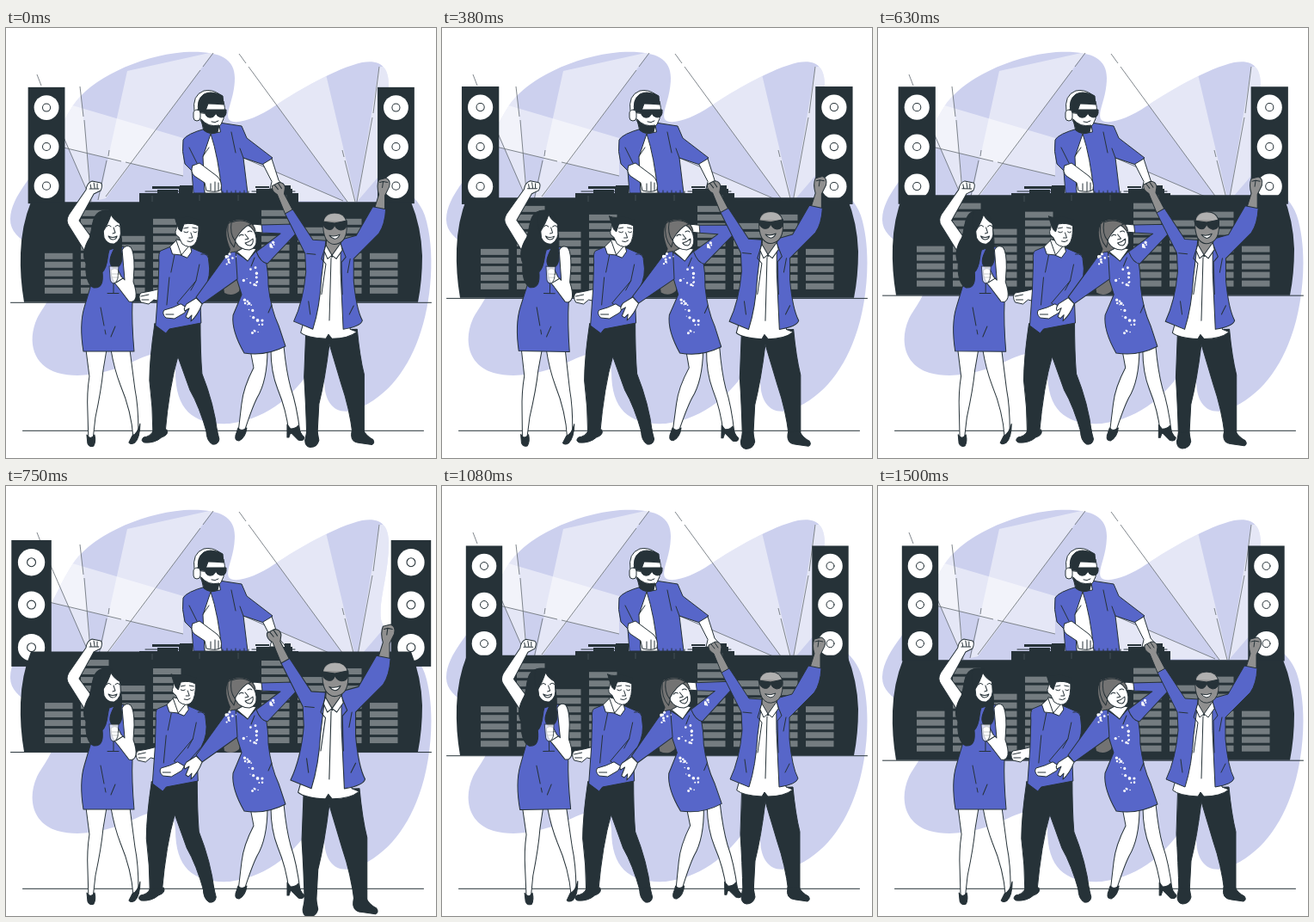
These frames come from a looping animation (500 px wide and 500 px high, 1540 ms). An HTML page:

```html
<!DOCTYPE html>
<html lang="en">
<head>
<meta charset="utf-8">
<title>Dance party</title>
<style>
html, body { margin: 0; width: 100%; height: 100%; overflow: hidden; background: #fff; }
svg { display: block; width: 100%; height: 100%; }
.ink { stroke: #263238; stroke-width: 1; stroke-linejoin: round; stroke-linecap: round; }
.b { fill: #5766c9; }
.k { fill: #263238; }
.w { fill: #fff; }
.g { fill: #909090; }
.h { fill: #737373; }
.n { fill: none; }
.bare { stroke: none; }
.beam { fill: #fff; opacity: .5; }
.ray { fill: none; stroke: #737a80; stroke-width: .9; }
</style>
</head>
<body>
<svg viewBox="0 0 500 500">
  <defs>
    <path id="blob" d="M5 222C6 195 32 172 48 145C58 128 64 112 78 90C98 60 152 33 207 28C246 26 266 34 266 58C266 82 255 97 259 106C265 114 290 106 312 91C342 71 384 47 414 40C436 36 445 46 445 66C445 104 433 132 436 155C442 180 476 186 487 218C500 258 495 320 480 360C465 402 438 434 402 445C382 449 371 436 370 412C371 390 366 385 355 396C337 423 308 454 260 460C220 462 197 446 197 400C196 374 177 374 152 386C119 402 86 408 60 401C32 393 24 365 36 338C44 322 62 305 56 278C48 256 4 250 5 222Z"/>
    <clipPath id="inBlob"><use href="#blob"/></clipPath>
  </defs>

  <use href="#blob" fill="#ccd0ee"/>
  <g clip-path="url(#inBlob)">
    <path class="beam" d="M36 54L86 68L100 202Z"/>
    <path class="beam" d="M141 50L241 28L116 198L108 200Z"/>
    <path class="beam" d="M50 82L206 128V172L50 135Z"/>
    <path class="beam" d="M271 30L372 54L407 202H397Z"/>
    <path class="beam" d="M434 45L470 45V130L408 202Z"/>
    <path class="beam" d="M276 151L392 201H276Z"/>
  </g>
  <g class="ray">
    <path d="M36 54L41 67M43 72L97 196M86 68L90 103M91 107L99 202M241 29L229 45M226 49L116 196M120 142L119 149M117 154L107 200M50 135L134 155M139 156L206 172"/>
    <path d="M271 30L279 41M282 45L397 202M434 45L427 99M426 104L408 202M391 142L393 150M394 154L406 202M276 151L392 201"/>
  </g>

  <g id="speakers"></g>
  <g id="booth">
    <path class="k" d="M29 202.500H471Q483 232 484 265Q484 294 479 319H21Q16 290 17 262Q18 230 29 202.500Z"/>
    <g id="bars" fill="#747c80"></g>
    <path class="ink n" d="M5.500 319.500H494.500"/>
  </g>
  <path class="ink n" d="M19.500 468.300H485.500"/>

  <!-- DJ -->
  <g class="ink">
    <path class="w" d="M228 119L248 109L258 119L266 192H231L226 148Z"/>
    <path class="b" d="M232 117Q210 123 206 130Q204 143 208 158L216 166L218 192H231L229 150L238 123Z"/>
    <path class="b" d="M248 110L274 114L280 128L310 151L300 159L276 151L281 192H251Q247 150 238 123L249 121Z"/>
    <path class="w" d="M217 160L225 157L245 172Q252 178 250 188Q245 192 233 189L231 180L219 172Q214 167 217 160Z"/>
    <path class="w" d="M299 158L309 152L317 177Q324 184 327 190L318 187H307L309 179Z"/>
    <path class="n" d="M238 181V189M243 179V190M247 180V189M213 139L222 157M229 149L236 139M276 151L272 140M262 121L267 145"/>
    <path class="w" d="M227 84L253 85Q257 100 250 112Q244 121 231 116L225 105Z"/>
    <path class="k" d="M224 98Q220 82 231 77Q242 72 252 79L253 89Q242 88 235 88L231 99Z"/>
    <path class="k" d="M227 106Q235 116 248 113L246 121Q237 125 230 119Z"/>
    <path class="k" d="M231 95H256Q257 104 250 104Q245 103 244 99Q242 105 236 104Q231 103 231 95Z"/>
    <path class="n" d="M239 109Q243 111 247 108"/>
    <path class="w" d="M219 97Q216 78 230 73Q240 71 248 77Q237 73 230 77Q221 83 224 98Z"/>
    <rect class="w" x="218" y="95" width="8" height="13" rx="4"/>
  </g>
  <path class="k" d="M155 192H340V203H155ZM170 184H202V183H217V192H201V187H170ZM176 188H200V192H176ZM290 184H306V186H290ZM291 187H333V192H291ZM324 183H331V188H324Z"/>
  <path class="ink n" d="M162 190H212M286 190H336M252 190V193M257 189V193M262 190V193M267 189V193M272 190V193M277 189V193M282 190V193"/>
  <path d="M170 202V195M225 201V194M270 201V194M326 201V194" stroke="#59646a" stroke-width=".6"/>

  <!-- Woman with a glass -->
  <g id="toast" class="ink">
    <path class="w" d="M93 374L97 405Q94 424 95 445L96 480H101L104 453Q111 420 113 398L117 374Z"/>
    <path class="w" d="M122 374Q126 397 133 415Q146 446 148 476L154 468Q154 440 150 420L144 374Z"/>
    <path class="k" d="M94 473Q98 480 103 473Q105 481 102 486Q97 488 95 483Z"/>
    <path class="k" d="M156 460Q153 472 147 474L143 482Q145 485 150 482Q156 476 156 460Z"/>
    <path class="w" d="M95 265L73 230Q69 224 73 217L93 188Q94 180 100 178L110 180Q113 182 110 189L102 193L85 224L104 250Z"/>
    <path class="n" d="M98 182L99 187M102 180L103 186M106 181V186M97 187L108 187"/>
    <path class="b" d="M101 258L137 254L142 290L147 318Q146 342 149 376H90Q85 345 91 325L99 298Z"/>
    <path class="n" d="M110 325L114 346M115 351L116 356M127 347L122 359"/>
    <path class="k" d="M111 213C99 216 101 233 97 244C91 254 88 264 93 274C92 287 95 299 102 302C112 303 113 294 112 284C119 277 117 267 120 258L126 256C121 266 118 274 125 279C135 279 136 268 134 260C136 245 132 216 121 212Z"/>
    <path class="w" d="M112 226Q114 216 122 217Q133 220 133 234Q135 246 126 251Q118 252 114 244Z"/>
    <path class="k" d="M111 213Q126 208 132 227Q126 224 122 217Q119 227 112 238Q107 223 111 213Z"/>
    <path class="n" d="M117 231Q119 228 122 231M127 231Q130 228 132 231M125 232L127 238L124 239"/>
    <path class="w" d="M119 242Q124 245 129 242Q128 246 124 246Q121 246 119 242Z"/>
    <path class="w" d="M135 258Q139 251 145 255Q149 260 149 278L148 295Q152 306 151 313Q149 320 143 318L130 301Q122 293 122 282Q125 278 130 281L134 289L138 293Z"/>
    <path class="n" d="M123 286H131M123 290H130M128 296L136 291"/>
    <path class="w" d="M120 277H131L130 291Q128 297 125 297Q121 296 121 290Z" opacity=".75"/>
    <path class="n" d="M125 297V308M118 308.500H131"/>
  </g>

  <!-- Man in a shirt -->
  <g id="step" class="ink">
    <path class="k" d="M173 344L226 338Q226 378 228 402Q242 437 246 471L234 472Q225 440 214 421L200 382Q190 416 185 472H171Q171 441 167 410Q167 385 173 344Z"/>
    <path class="k" d="M171 469L187 467Q190 473 181 476Q173 483 161 482Q156 480 160 476Q168 475 171 469Z"/>
    <path class="k" d="M233 468L245 466L248 478Q247 485 240 484Q233 480 233 468Z"/>
    <path class="w" d="M180 303L168 306L157 308Q153 312 157 319L166 321L172 316L180 318Z"/>
    <path class="n" d="M157 312L166 310M158 316H166"/>
    <path class="w" d="M198 246L196 263L204 267L215 261L213 250Z"/>
    <path class="b" d="M192 254L180 259Q177 261 178 272L177 304L174 346L186 355L190 350L227 343L226 319Q236 300 235 264L214 255L204 264Z"/>
    <path class="b bare" d="M227 262Q236 261 236 272Q239 288 231 303L210 327L199 320L221 294Z"/>
    <path class="n" d="M227 263Q236 261 236 272Q239 288 231 303L210 327L199 320L221 294"/>
    <path class="w" d="M203 321L194 325L184 328Q181 332 186 337L196 338L208 331L211 326Z"/>
    <path class="n" d="M196 264L192 284M190 290L187 322M186 333H195M225 275L221 294L215 305"/>
    <path class="w" d="M191 254L198 247L204 264L194 263ZM204 264L214 252L216 260L211 267Z"/>
    <path class="w" d="M200 224L224 226Q225 246 219 252Q213 257 205 251L201 243Q195 240 198 234Z"/>
    <path class="k" d="M196 219Q204 222 211 219L225 223L224 230Q217 226 207 228L204 237L201 234Q198 227 196 219Z"/>
    <path class="n" d="M207 237Q210 239 212 237M218 237Q220 239 222 237M207 233L212 232M217 232L222 233M215 238L217 244L213 244M211 248Q215 250 218 247"/>
  </g>

  <!-- Woman in sequins -->
  <g id="sway" class="ink">
    <path class="w" d="M284 374L288 395Q276 418 274 437L270 471L277 470Q286 442 292 430Q304 410 304 374Z"/>
    <path class="w" d="M308 374Q308 400 316 420Q326 444 329 470L342 470Q338 438 331 418Q326 400 323 370Z"/>
    <path class="k" d="M270 465Q274 470 280 465Q279 476 271 480Q266 480 267 474Z"/>
    <path class="k" d="M327 461L331 466Q337 466 340 462Q342 472 347 476Q346 481 340 479L331 470L329 476H327Z"/>
    <path class="h bare" d="M260 225C253 235 257 248 261 257C255 272 251 295 254 308Q263 313 271 306L280 268L285 230Z"/>
    <path class="b" d="M267 261L281 270L293 257L302 270Q305 283 305 300Q308 327 317 346L325 370Q302 382 277 378Q262 352 264 334L274 310L267 288Z"/>
    <path class="b" d="M296 229L335 228Q344 231 337 239L304 274Q296 273 291 260L319 239L297 238Z"/>
    <path class="w" d="M297 229L288 228L283 232L288 237L298 238Z"/>
    <path class="w" d="M268 260L279 254L291 257L281 271Z"/>
    <path class="b" d="M267 260Q258 260 252 270L221 313L228 321L269 292Z"/>
    <path class="w" d="M221 314L210 321Q206 326 208 329L213 326L209 336L212 338L216 334L215 341Q223 334 228 321Z"/>
    <path class="h" d="M258 228Q266 220 280 224Q288 227 290 236L270 237L265 255Q256 245 258 228Z"/>
    <path class="w" d="M266 239Q272 230 281 229Q290 234 291 245Q292 256 283 258Q272 258 267 249Z"/>
    <path class="h" d="M262 226Q275 221 285 228Q275 231 266 247Q260 239 262 226Z"/>
    <path class="n" d="M271 242Q273 239 276 241M281 237Q284 235 286 237M278 240L282 245L278 246M285 277L289 267M309 322L305 331"/>
    <path class="w" d="M278 250Q283 249 287 245Q288 251 284 253Q280 253 278 250Z"/>
    <g id="sequins" class="bare w"></g>
  </g>

  <!-- Man in sunglasses -->
  <g id="jump" class="ink">
    <path class="k" d="M349 352L408 350Q411 382 416 402L416 470L403 472Q399 440 390 414L376 367Q371 408 364 436L362 474H350Q349 436 347 405Z"/>
    <path class="k" d="M350 468L362 467L364 478Q362 486 354 486Q348 485 348 478Z"/>
    <path class="k" d="M402 467L415 466Q418 473 426 477Q429 481 425 483L411 481Q399 480 402 467Z"/>
    <path class="w" d="M372 250L389 250L400 350L408 353Q398 361 379 361L375 356L372 361Q350 360 343 354Z"/>
    <path class="g" d="M325 217L316 195Q309 191 310 185L318 181Q324 181 325 187L324 194L335 215Z"/>
    <path class="g" d="M428 211L433 195Q430 185 433 178L441 176Q447 178 445 186L440 196L440 213Z"/>
    <path class="n" d="M313 184L317 189M317 182L321 188M434 181L438 180L437 187M438 180L443 181"/>
    <path class="b" d="M372 248L357 247L334 212L325 217L348 263L349 284Q346 318 335 341L357 350Q365 325 367 290Z"/>
    <path class="b" d="M389 247L407 242L426 209L441 212Q440 230 433 240L404 269V294Q407 327 414 340Q412 347 392 350L389 285Z"/>
    <path class="n" d="M378 268L376 340M373 250L367 269L372 275L367 310M388 250L395 267L390 273L391 310M350 263L360 264M400 269L397 285M352 318L354 333M404 323L399 333"/>
    <path class="g" d="M373 242L390 242L389 257L379 267L372 257Z"/>
    <path class="w" d="M372 253L379 265L374 269L370 260ZM389 251L379 265L384 269L391 259Z"/>
    <path class="g" d="M369 227Q370 216 382 216Q395 216 396 229Q397 247 387 251Q378 255 372 246Q368 238 369 227Z"/>
    <path class="bare" fill="#b0b0b0" d="M370 225Q373 217 382 217Q393 217 395 226Z"/>
    <path class="k" d="M368 226L382 228L396 225Q397 236 389 236Q384 235 382 230Q380 237 374 235Q369 233 368 226Z"/>
    <path class="w" d="M376 242Q382 244 388 241Q386 246 382 246Q378 245 376 242Z"/>
  </g>
</svg>

<script>
const LOOP = 1540;
const LEAD = .009; // the cycle is already slightly under way at time zero
const NS = 'http://www.w3.org/2000/svg';
const $ = id => document.getElementById(id);

function add(parent, tag, attrs) {
  const el = document.createElementNS(NS, tag);
  for (const key in attrs) el.setAttribute(key, attrs[key]);
  parent.append(el);
}

for (const cx of [49, 451.5]) {
  const box = $('speakers');
  add(box, 'rect', { x: cx - 21.2, y: 69.500, width: 42.4, height: 134, class: 'k' });
  for (const cy of [93, 138, 183.2]) {
    add(box, 'circle', { cx, cy, r: 14.3, class: 'w' });
    add(box, 'circle', { cx, cy, r: 4.5, class: 'ink w' });
  }
}

// Equalizer columns: left edge and topmost row
for (const [x, top] of [[45, 262], [87, 212], [129, 242], [171, 222], [297, 212], [339, 232], [381, 222], [423, 262]])
  for (let y = top; y < 310; y += 10)
    add($('bars'), 'rect', { x, y, width: 32.500, height: 7 });

let seed = 11;
const rand = () => (seed = seed * 16807 % 2147483647) / 2147483647;
for (const [x, y, spread, count] of [[263, 268, 7, 11], [284, 289, 8, 12], [282, 322, 5, 8], [292, 345, 8, 10], [310, 252, 5, 5]])
  for (let i = 0; i < count; i++)
    add($('sequins'), 'circle', {
      cx: x + (rand() * 2 - 1) * spread,
      cy: y + (rand() * 2 - 1) * spread * 1.3,
      r: .6 + rand() * 1.3
    });

// Straight interpolation through [percent, value] keys
function track(keys, p) {
  let i = 1;
  while (i < keys.length - 1 && p > keys[i][0]) i++;
  const [p0, v0] = keys[i - 1], [p1, v1] = keys[i];
  return v0 + (v1 - v0) * (p - p0) / (p1 - p0);
}

const BEAT = [[0, 1], [10, 1.1], [30, 1], [40, 1], [50, 1.1], [70, 1], [100, 1]];
const WIND = [[0, 0], [25, 1], [75, -1], [100, 0]];
const FLOAT = [[0, 0], [50, -10], [100, 0]];
const SHAKE = [[0, 0], [10, -1], [20, 2], [30, -4], [40, 4], [50, -4], [60, 4], [70, -4], [80, 2], [90, -1], [100, 0]];

const move = (id, value) => $(id).setAttribute('transform', value);
const scaleAt = (s, x, y) => `translate(${x} ${y}) scale(${s}) translate(${-x} ${-y})`;

function draw(t) {
  const p = (t / LOOP + LEAD) % 1 * 100;
  const beat = track(BEAT, p), wind = track(WIND, p);
  move('speakers', scaleAt(beat, 250.25, 137));
  move('jump', scaleAt(beat, 377.5, 331));
  move('booth', `translate(0 ${track(FLOAT, p)})`);
  move('toast', `rotate(${wind} 120 332)`);
  move('sway', `rotate(${wind} 280 352)`);
  move('step', `translate(${track(SHAKE, p)} 0)`);
}

const start = performance.now();
function tick(now) {
  draw(Math.max(0, now - start) % LOOP);
  requestAnimationFrame(tick);
}
draw(0);
requestAnimationFrame(tick);
</script>
</body>
</html>
```
